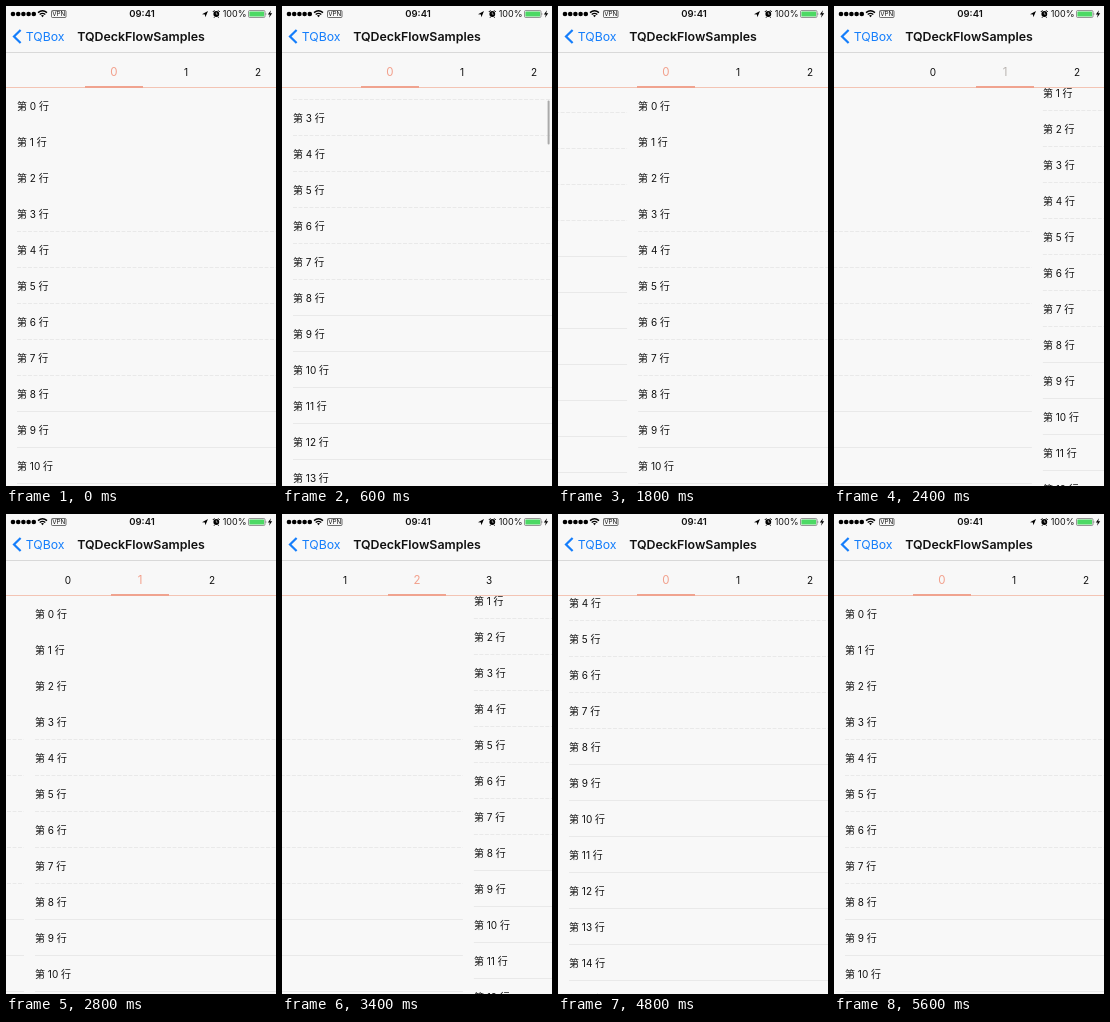
Write an HTML page that moves like this. It is 270 by 480 pixels and loops after 5.8 s.

```html
<!DOCTYPE html>
<html lang="zh">
<head>
<meta charset="utf-8">
<style>
html, body { margin: 0; width: 100%; height: 100%; overflow: hidden; background: #f8f8f8; }
svg { display: block; width: 100vw; height: 100vh; }
text { font-family: Inter, "Noto Sans CJK SC", "Noto Sans CJK", sans-serif; fill: #111; }
.row { font-size: 10px; }
.tab { font-size: 10px; text-anchor: middle; }
.status { font-size: 9px; }
</style>
</head>
<body>
<svg id="stage" viewBox="0 0 270 480">
  <defs><clipPath id="body"><rect y="82" width="270" height="398"/></clipPath></defs>
  <rect width="270" height="480" fill="#f8f8f8"/>
  <g id="pages" clip-path="url(#body)"></g>
  <rect id="thumb" x="265.6" width="2" height="44" rx="1" fill="#aaa"/>

  <g id="statusBar">
    <g id="signal" fill="#000"></g>
    <g fill="none" stroke="#000" stroke-width="1.4">
      <path d="M32 6.6Q36.5 2.8 41 6.6M33.7 8.5Q36.5 6.2 39.3 8.5"/>
    </g>
    <path d="M35 9.6Q36.5 8.4 38 9.6L36.5 11.3Z"/>
    <rect x="45.5" y="4.5" width="14.5" height="7" rx="1" fill="none" stroke="#333" stroke-width=".7"/>
    <text x="52.8" y="10.4" text-anchor="middle" style="font-size:6.3px">VPN</text>
    <text class="status" x="136" y="11" text-anchor="middle" font-weight="600" style="font-size:9.5px">09:41</text>
    <path d="M196 8.2L202 5L199.4 11.2L198.9 8.5Z"/>
    <circle cx="210.3" cy="8" r="2.9"/>
    <path d="M206.8 6L208.5 4.3M213.8 6L212.1 4.3M208.4 11.3L207.7 12M212.2 11.3L212.9 12" stroke="#000" stroke-width="1"/>
    <path d="M210.3 6.3V8.2H211.7" fill="none" stroke="#f8f8f8" stroke-width=".6"/>
    <text class="status" x="240.5" y="11" text-anchor="end">100%</text>
    <rect x="242.5" y="4.5" width="16.5" height="7" rx="1.2" fill="none" stroke="#555" stroke-width=".6"/>
    <rect x="243.4" y="5.4" width="14.7" height="5.2" rx=".6" fill="#4cd964"/>
    <path d="M259.7 6.8Q261.2 8 259.7 9.2Z" fill="#555"/>
    <path d="M265 4.3L261.8 8.5H263.8L263 11.7L266.2 7.3H264.2Z"/>
  </g>

  <path d="M14.6 24L8 30.5L14.6 37" fill="none" stroke="#157efb" stroke-width="2.2"/>
  <text x="19.7" y="35" style="font-size:12.3px;fill:#157efb">TQBox</text>
  <text x="135" y="35" text-anchor="middle" font-weight="600" style="font-size:12.4px">TQDeckFlowSamples</text>
  <path d="M0 46.5H270" stroke="#d2d2d2" stroke-width=".8"/>
  <path d="M0 81.5H270" stroke="#f3c4b4" stroke-width="1"/>
  <g id="tabs"></g>
  <rect id="marker" y="80" width="58" height="2" fill="#f0a38f"/>
</svg>
<script>
const LOOP = 5800, STEP = 200, WIDTH = 270, ROW = 36;
const $ = id => document.getElementById(id);

function add(parent, tag, attrs = {}, content = '') {
  const el = document.createElementNS('http://www.w3.org/2000/svg', tag);
  for (const key in attrs) el.setAttribute(key, attrs[key]);
  el.textContent = content;
  parent.appendChild(el);
  return el;
}

// Piecewise linear value through [time, value] points.
function track(t, points) {
  let [t0, v0] = points[0];
  for (const [t1, v1] of points) {
    if (t < t1) return t <= t0 ? v0 : v0 + (v1 - v0) * (t - t0) / (t1 - t0);
    [t0, v0] = [t1, v1];
  }
  return v0;
}

const pagePath = [[1300, 0], [1500, .12], [1800, .744], [2000, .95], [2250, 1],
  [2400, 1.267], [2600, 1.8], [2900, 2], [3200, 2], [3400, 2.33], [3600, 2.02],
  [3800, 1.5], [3950, 1], [4100, .2], [4200, .007], [4300, 0]];
const scrollPath = [[0, 0], [200, 8], [400, 42], [600, 96], [800, 139], [1000, 155]];
const tabPath = [[2250, 0], [2400, 9], [2600, 46], [2900, 46], [3100, 117],
  [3800, 117], [4000, 46], [4200, 46], [4400, 0]];
const selectedSteps = [[0, 0], [2250, 1], [2900, 2], [3900, 1], [4300, 0]];
const REWIND = 5200;

for (let i = 0; i < 5; i++) add($('signal'), 'circle', { cx: 7 + i * 5.2, cy: 8, r: 2.3 });

const tabs = Array.from({ length: 6 }, (_, i) =>
  add($('tabs'), 'text', { class: 'tab', y: 70 }, i));

const pages = Array.from({ length: 4 }, () => {
  const page = add($('pages'), 'g');
  const rows = Array.from({ length: 16 }, (_, k) => {
    const y = 100 + ROW * k;
    add(page, 'text', { class: 'row', x: 11, y: y + 3.8 }, `第 ${k} 行`);
    return add(page, 'path', {
      d: `M11 ${y + 17.5}H${WIDTH}`, stroke: '#e8e8e8', 'stroke-width': .9,
      'stroke-dasharray': k < 8 ? '4 1.5' : 'none'
    });
  });
  return { page, rows };
});

function pageScroll(i, t) {
  if (i === 0) return t < REWIND ? track(t, scrollPath) : 0;
  // Later pages enter with an inset that is corrected on arrival.
  return i === 3 || (i === 2 && t < 2500) ? 49 : 0;
}

function draw(t) {
  const position = track(t, pagePath);
  pages.forEach(({ page, rows }, i) => {
    const x = (i - position) * WIDTH, scroll = pageScroll(i, t);
    page.setAttribute('transform', `translate(${x.toFixed(1)} ${-Math.round(scroll)})`);
    page.setAttribute('visibility', Math.abs(x) < WIDTH ? 'visible' : 'hidden');
    rows.forEach((line, k) => line.setAttribute('opacity', scroll || k > 2 ? 1 : 0));
  });

  $('thumb').setAttribute('y', 84 + pageScroll(0, t) * 398 / 3600);
  $('thumb').setAttribute('opacity', track(t, [[0, 0], [200, 1], [1200, 1], [1400, 0]]));

  const selected = selectedSteps.filter(([start]) => t >= start).pop()[1];
  const shift = track(t, tabPath);
  const blending = t > 2250 && t < 2500;
  tabs.forEach((tab, i) => {
    const active = i === selected;
    tab.setAttribute('x', 108 + 72 * i - shift);
    tab.style.fill = active ? (blending ? '#b9b4b1' : '#f2a08c') : '#111';
    tab.style.fontSize = active ? '11.5px' : '10px';
  });
  $('marker').setAttribute('x', 79 + 72 * selected - shift);
}

const start = performance.now();
function tick() {
  const t = (performance.now() - start) % LOOP;
  draw(Math.floor(t / STEP) * STEP);
  requestAnimationFrame(tick);
}
draw(0);
requestAnimationFrame(tick);
</script>
</body>
</html>
```
